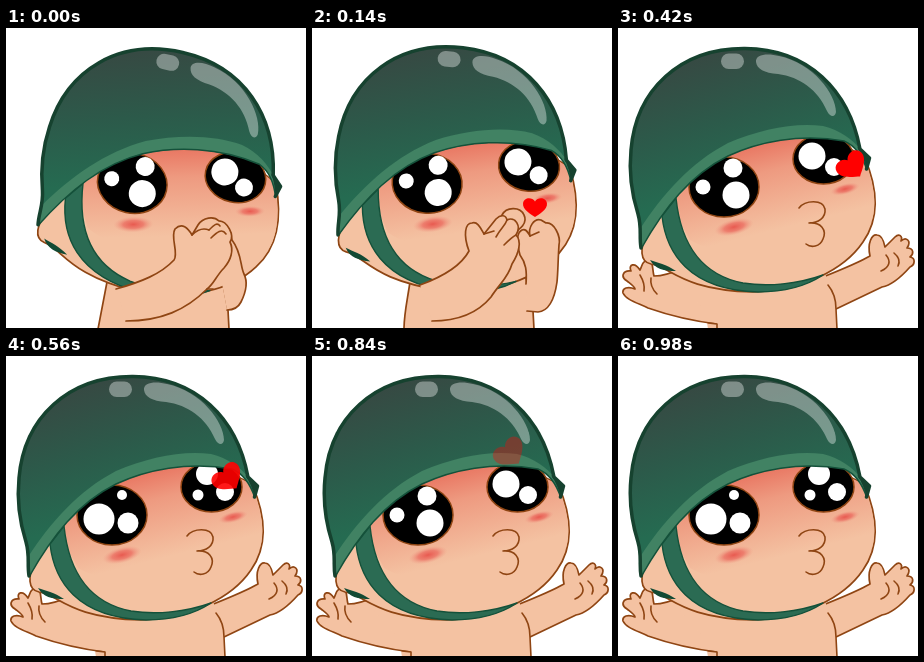
These frames come from a looping animation (300x300 px, 1.12 s). An HTML page:

```html
<!DOCTYPE html>
<html lang="en">
<head>
<meta charset="utf-8">
<title>Blowing a kiss</title>
<style>
  html, body { margin: 0; width: 100%; height: 100%; overflow: hidden; background: #fff; }
  svg { display: block; width: 100%; height: 100%; }
  .skin { fill: #f4c2a2; stroke: #8f4513; stroke-width: 1.7; stroke-linejoin: round; stroke-linecap: round; }
  .line { fill: none; stroke: #8f4513; stroke-width: 1.6; stroke-linecap: round; stroke-linejoin: round; }
  .strap { fill: #2b6b53; stroke: #14513a; stroke-width: 1.4; stroke-linejoin: round; }
  .eye { fill: #000; stroke: #8f4513; stroke-width: 1.5; }
  .shine { fill: #fff; fill-opacity: .37; }
</style>
</head>
<body>
<svg viewBox="0 0 300 300">
  <defs>
    <linearGradient id="dome" gradientUnits="userSpaceOnUse" x1="92" y1="28" x2="130" y2="150">
      <stop offset="0" stop-color="#364a43"/>
      <stop offset=".5" stop-color="#2c5a4a"/>
      <stop offset="1" stop-color="#256b51"/>
    </linearGradient>
    <linearGradient id="flush" gradientUnits="userSpaceOnUse" x1="143" y1="112" x2="165" y2="200">
      <stop offset="0" stop-color="#e8735f"/>
      <stop offset=".35" stop-color="#ee9a80"/>
      <stop offset="1" stop-color="#f4c2a2"/>
    </linearGradient>
    <radialGradient id="cheek">
      <stop offset="0" stop-color="#e85a50"/>
      <stop offset=".5" stop-color="#ec7466" stop-opacity=".85"/>
      <stop offset="1" stop-color="#f0a088" stop-opacity="0"/>
    </radialGradient>
  </defs>

  <g id="back"></g>

  <g id="head">
    <path class="skin" d="M30 204C21 220 22 234 33 236C52 238 62 262 135 264C185 262 226 242 245 214C262 190 260 160 246 128L190 100L110 118L42 180Z"/>
    <path fill="url(#flush)" d="M52 176L110 118L190 100L245 128C256 156 259 175 254 192C190 215 110 235 72 212Z"/>
    <path d="M32 232C40 235 48 236 58 243C46 243 37 241 32 232Z" fill="#124a34"/>
    <path class="strap" d="M44 188C48 224 70 262 140 264C170 264 190 257 205 247C180 256 150 259 125 255C84 247 63 218 58 170Z"/>
    <ellipse cx="116" cy="199" rx="20" ry="8" fill="url(#cheek)" transform="rotate(-14 116 199)"/>
    <ellipse cx="227" cy="161" rx="15" ry="5.500" fill="url(#cheek)" transform="rotate(-14 227 161)"/>
    <ellipse class="eye" cx="106" cy="159" rx="35" ry="30"/>
    <ellipse class="eye" cx="205.500" cy="131" rx="30.500" ry="25"/>
    <g id="sparks" fill="#fff"></g>
    <path id="mouth" class="line" stroke-width="2" d="M181 180C187 172 205 171 207 181C208 190 200 195 191 195C203 194 209 202 205 211C202 219 193 220 188 216"/>
    <path d="M23 221C21 208 24 200 20 186C13 164 11 142 13 122C18 62 62 20 127 20.500C190 21 231 62 242 121L252 130L249 142C245 130 238 118 226 113C182 105 140 114 110 128C72 147 46 180 23 221Z" fill="url(#dome)"/>
    <path d="M23 221L22 201C45 166 72 135 110 115C142 101 178 94 205 98C222 102 235 112 243 122L249 141C245 130 238 118 226 113C182 105 140 114 110 128C72 147 46 180 23 221Z" fill="#418263"/>
    <path d="M249 142C245 130 238 118 226 113C182 105 140 114 110 128C72 147 46 180 23 221" fill="none" stroke="#14513a" stroke-width="1.500"/>
    <path d="M239 119L252 130L249 142C247 134 244 126 239 119Z" fill="#16422f"/>
    <path d="M23 220C21 208 24 200 20 186C13 164 11 142 13 122C18 62 62 20 127 20.500C190 21 231 62 242 121L251.500 130L248.500 141" fill="none" stroke="#16422f" stroke-width="3.500" stroke-linejoin="round" stroke-linecap="round"/>
    <rect class="shine" x="103" y="25.500" width="23" height="15.500" rx="7.700"/>
    <path class="shine" d="M138 34C137 26 150 25 161 28C195 35 218 66 218 84C217 90 212 89 209 83C200 62 182 49 160 46C146 45 139 41 138 34Z"/>
  </g>

  <g id="front"></g>
  <path id="heart" fill="#f00" d="M0 11C-4 8 -14 3 -13 -4C-12 -11 -3 -11 0 -6C3 -11 12 -11 13 -4C14 3 4 8 0 11Z"/>
</svg>

<script>
const STEP = 140;
const $ = id => document.getElementById(id);

// Each pose: shapes behind the head, shapes in front of it, and hand creases.
const poses = {
  cover: {
    back: ["M92 301C95 286 98 270 101 254L215 245L222 282L223 301"],
    front: [
      "M205 197C213 188 224 197 226 212C236 225 234 238 238 246C243 256 239 266 235 274C232 280 227 282 221 282",
      "M110 261C135 254 155 246 168 232C173 225 164 209 169 201C176 194 182 200 186 207L192 197C197 189 208 188 213 193C221 193 229 207 224 214C228 222 225 232 218 240C210 248 208 256 201 261C180 282 155 293 120 293"
    ],
    folds: ["M186 207C190 203 196 199 203 202", "M203 202C208 197 211 194 214 198", "M205 210C211 204 216 200 220 206", "M201 261L207 261"]
  },
  lift: {
    back: ["M92 301C92 286 95 274 98 254L213 245L221 283L222 301"],
    front: [
      "M190 187C194 179 208 178 212 187C216 195 208 202 201 204",
      "M214 256C215 243 214 235 208 227C205 216 204 205 210 202C214 200 216 205 218 208C216 199 222 190 229 192L234 195C242 194 249 208 247 217C246 232 246 244 245 254C243 268 238 283 226 284L215 283",
      "M108 257C130 249 149 238 157 223C151 207 153 195 160 195C166 193 169 201 172 206L184 191C189 186 194 187 195 192C203 188 210 198 204 207C210 213 207 225 200 236C196 250 188 255 179 269C165 286 145 293 120 293"
    ],
    folds: ["M172 206L182 203", "M184 209C189 200 193 198 195 192", "M192 217C198 211 202 208 204 207", "M218 208L227 204"]
  },
  open: {
    back: [
      "M82 301L81 262L130 240L206 246C215 257 221 268 221 280L222 301",
      "M205 248C220 241 232 234 241 229C248 226 239 221 244 215C250 213 257 219 261 217C265 207 272 208 272 214C277 216 276 220 273 222C277 225 276 229 272 231C265 237 259 241 253 244C247 262 238 276 221 281"
    ],
    front: ["M81 270C80 262 78 256 73 251C65 247 66 239 72 236C60 235 46 222 51 213C55 207 61 210 65 213C57 204 59 196 65 196C72 197 77 206 81 213L94 222C100 223 102 215 106 212C113 208 118 215 115 223C123 232 122 243 112 250C114 255 118 260 121 267"],
    folds: ["M65 213C70 214 76 216 81 221", "M72 236C76 235 79 237 80 241", "M82 250C78 241 82 234 89 232", "M258 226C262 229 260 234 256 236"]
  },
  wide: {
    back: [
      "M62 241C52 246 44 248 36 248C34 241 36 234 30 233C24 232 24 239 22 242C17 234 10 236 13 243C5 242 2 249 9 253C14 257 17 259 17 261C10 258 4 260 5 265C8 272 20 275 30 280C50 287 75 293 99 296L100 262",
      "M205 249C225 241 240 235 252 228C249 215 254 206 259 207C264 207 266 214 267 219L277 209C281 205 285 208 283 213C288 208 294 213 289 220C296 220 296 226 292 229C298 230 297 237 292 239C284 248 275 257 264 259L218 281"
    ],
    front: [],
    torso: "M99 296L89 295L90 301L219 301L218 281C218 272 215 263 210 257L205 235L70 230L62 255Z",
    folds: ["M22 247C25 252 27 257 26 263", "M33 250C32 256 35 262 39 266", "M268 227C273 233 272 239 263 243", "M276 225C281 229 282 234 280 238", "M90 295L99 296V301", "M210 257C215 263 218 272 218 281L219 301"]
  }
};

// Sparkles in the eyes: x, y, radius.
const sparks = {
  a: [[118, 167, 13.5], [115, 140, 9.5], [85, 159, 7.5], [194, 128, 13.5], [216, 139, 9]],
  b: [[98, 147, 12.5], [123, 162, 10.5], [95, 175, 6], [212, 140, 12], [188, 124, 7], [215, 117, 7]],
  c: [[93, 163, 15.5], [122, 167, 10.5], [116, 139, 5], [201, 118, 11], [219, 136, 9], [192, 139, 5.5]]
};

// head: left brim x, y, turn; heart: x, y, scale, turn, opacity.
const rest = [24, 220, 0];
const steps = [
  { pose: "cover", head: [33, 197, 12.5], spark: "a" },
  { pose: "lift", head: [27, 207, 6.2], spark: "a", heart: [223, 179, .92, 0, 1] },
  { pose: "open", head: [25, 215, 2.4], spark: "a", heart: [233, 160, 1.1, -14, 1] },
  { pose: "wide", head: rest, spark: "a", heart: [234, 138, 1.2, -38, 1] },
  { pose: "wide", head: rest, spark: "c", heart: [222, 122, 1.22, -40, .9] },
  { pose: "wide", head: rest, spark: "b", heart: [209, 109, 1.24, -40, .75] },
  { pose: "wide", head: rest, spark: "a", heart: [198, 97, 1.26, -40, .35] },
  { pose: "wide", head: rest, spark: "c" }
];

const shape = (cls, d) => `<path class="${cls}" d="${d}"/>`;
const skin = list => list.map(d => shape("skin", d)).join("");

function drawPose(pose) {
  const folds = pose.folds.map(d => shape("line", d)).join("");
  const torso = pose.torso ? `<path fill="#f4c2a2" d="${pose.torso}"/>` : "";
  const inFront = pose.front.length > 0;
  $("back").innerHTML = skin(pose.back) + torso + (inFront ? "" : folds);
  $("front").innerHTML = skin(pose.front) + (inFront ? folds : "");
}

function show({ pose, head, spark, heart }) {
  const [x, y, turn] = head;
  drawPose(poses[pose]);
  $("head").setAttribute("transform", `translate(${x} ${y}) rotate(${turn}) translate(-24 -220)`);
  $("mouth").style.display = pose === "open" || pose === "wide" ? "" : "none";
  $("sparks").innerHTML = sparks[spark]
    .map(([cx, cy, r]) => `<circle cx="${cx}" cy="${cy}" r="${r}"/>`).join("");
  $("heart").style.display = heart ? "" : "none";
  if (heart) {
    const [hx, hy, size, tilt, alpha] = heart;
    $("heart").setAttribute("transform", `translate(${hx} ${hy}) rotate(${tilt}) scale(${size})`);
    $("heart").setAttribute("opacity", alpha);
  }
}

let start = null;
let shown = -1;
function tick(now) {
  start ??= now;
  const i = Math.floor((now - start) / STEP) % steps.length;
  if (i !== shown) show(steps[shown = i]);
  requestAnimationFrame(tick);
}
show(steps[0]);
requestAnimationFrame(tick);
</script>
</body>
</html>
```
